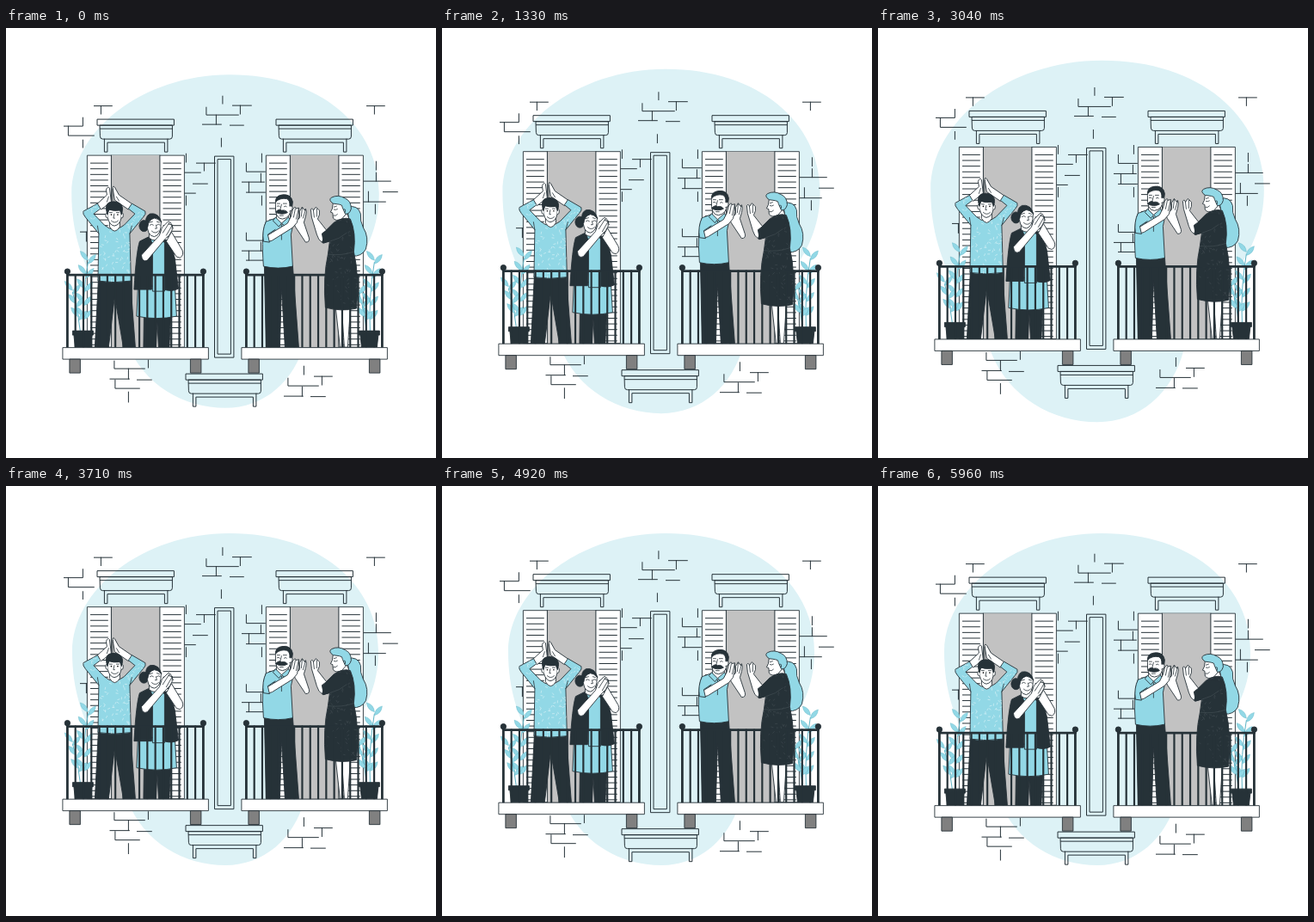
Write an HTML page that moves like this. It is 500 px wide and 500 px high and loops after 6 s.

```html
<!DOCTYPE html>
<html lang="en">
<head>
<meta charset="utf-8">
<title>Applause from the balconies</title>
<style>
html, body { margin: 0; width: 100%; height: 100%; overflow: hidden; background: #fff; }
svg { display: block; width: 100vw; height: 100vh; }
.l { fill: none; stroke: #263238; stroke-width: 1; stroke-linecap: round; stroke-linejoin: round; }
.w, .c, .d { stroke: #263238; stroke-width: .9; stroke-linejoin: round; }
.w { fill: #fff; }
.c { fill: #92d8e6; }
.d { fill: #263238; }
.g { fill: #c2c2c2; }
.t { fill: none; stroke: #263238; stroke-width: .8; stroke-linecap: round; }
</style>
</head>
<body>
<svg viewBox="0 0 500 500">
<defs>
  <g id="lintel">
    <path class="l" d="M106 106H195V113H106ZM109 113H193V126Q193 129 190 129H112Q109 129 109 126ZM109 117H193M114 129V144H117.500V133H184V144H187.500V129"/>
  </g>
  <g id="window">
    <path class="w" d="M94 148H207V371H94Z"/>
    <path class="g" d="M122 148H178.500V371H122Z"/>
    <path class="l" d="M122 148V371M178.500 148V371"/>
    <path class="l" id="slats"/>
  </g>
  <g id="rail">
    <path class="l" id="bars" style="stroke-width:2.200"/>
    <path class="l" d="M71 287H229" style="stroke-width:2.800"/>
    <path class="l" d="M71 284V371M229 284V371" style="stroke-width:2.800"/>
    <circle class="d" cx="71" cy="283" r="3.200"/><circle class="d" cx="229" cy="283" r="3.200"/>
    <path class="w" d="M65.500 371.500H235V385H65.500Z"/>
    <path class="w" style="fill:#808080" d="M73.500 385H86V401H73.500ZM214 385H226.500V401H214Z"/>
  </g>
  <g id="plant">
    <g id="leaves" fill="#92d8e6" stroke="#5fb4c6" stroke-width=".4"></g>
    <path class="d" d="M77 352H101V357H99.500L98 371H80L78.500 357H77Z"/>
  </g>
  <path id="sweater" d="M106 204L89.500 213Q88.500 216 92 220L107.500 239L106.500 294Q125 297 145 294L143.500 239L159 220Q163 216 161.500 213L146 204L142 210L149.500 216L137 229Q125 239 114 229L101.500 216L109.500 210Z"/>
  <path id="dress" d="M381 226Q392 219 400 222Q407 238 404 260Q411 290 407 326Q390 330 371 325Q368 290 374 263L376 248L368 250Q364 246 366 241Z"/>
  <clipPath id="sweaterClip"><use href="#sweater"/></clipPath>
  <clipPath id="dressClip"><use href="#dress"/></clipPath>
</defs>

<path id="blob" fill="#ddf2f6" d="M260 55C365 55 433 115 433 193C433 272 372 305 347 365C335 410 300 441 255 441C208 441 160 415 141 365C127 322 77 283 77 193C77 121 158 55 260 55Z"/>

<g id="scene">
  <path class="l" id="bricks"/>
  <path class="l" d="M242.500 149H264.500V383H242.500ZM246 152.500H261V379H246Z"/>
  <use href="#lintel"/><use href="#lintel" x="208"/><use href="#lintel" x="103" y="296"/>
  <use href="#window"/><use href="#window" x="208"/>
  <use href="#plant"/><use href="#plant" x="333"/>

  <!-- man with raised arms -->
  <path class="d" d="M107 292L103 371H119L126 312L136 371H150L144 292Z"/>
  <path class="w" d="M105 205L117 194L116 188Q118 183 120 186L122 202L110 211ZM147 205L131 194L126 185Q123 182 124 188L126 200L142 211Z"/>
  <path class="t" d="M123.500 187V202M128 196L131 201M119 196L117 202"/>
  <use href="#sweater" class="c"/>
  <path id="knit" stroke="#fff" stroke-width=".6" fill="none" opacity=".7" clip-path="url(#sweaterClip)"/>
  <path class="t" d="M107.500 239L106 230M143.500 239L146 230"/>
  <path class="w" d="M120 225V231Q126 241 132 231V225Z"/>
  <path class="w" d="M117 211L118 221Q120 229 125.500 230Q132 229 133.500 221L134 211Z"/>
  <path class="w" d="M118 215Q114 214 116 220L118 221M133.500 215Q137 214 135.500 220L133.500 221"/>
  <path class="d" d="M117.500 217Q114 206 119 203Q126 200 132 204Q137 207 134 217L132 212Q124 213 119.500 211Z"/>
  <path class="t" d="M120 214.500H123M128 214.500H131M125.500 216L124.500 221H126M122 224Q126 228 130 224"/>
  <circle cx="122" cy="217" r=".8"/><circle cx="129.500" cy="217" r=".8"/>

  <!-- woman with a bun -->
  <path class="d" d="M160 335L159.500 371H174L175.500 342L177 371H189.500L191 335Z"/>
  <path class="c" d="M153 300L151.500 335Q175 340 198 335L196 300Z"/>
  <path class="d" d="M165 243L155 248Q151 260 148.500 304H169L171 246ZM183 246V304Q193 307 200 303L196 268L190 247Z"/>
  <path class="c" d="M167 243L170 252V306H184V250L180 243Z"/>
  <ellipse class="d" cx="160" cy="230" rx="5.500" ry="6.500"/>
  <path class="w" d="M166 237V244Q173 250 179 243V237Z"/>
  <path class="w" d="M163.500 224Q163 242 172 242.500Q180 241 180 225L176 218H167Z"/>
  <path class="d" d="M163 232Q160 219 167 216Q177 214 180.500 226Q176 221 172 221Q165 223 164.500 231Z"/>
  <path class="t" d="M167 229Q169 227 171 229M175 229Q177 227 179 229M174 229L175 233H173M169 236Q173 240 177 236M166.500 226L170 225M175 225L178 226"/>
  <path class="w" d="M192 237L204.500 258Q207 264 202 267L198 266L186 248Z"/>
  <path class="w" d="M157 264L178 241L181 232L188 225Q191 224 189 228L193 229Q194 235 190 240L184 246L164 270Q158 273 157 264Z"/>
  <path class="t" d="M189 227L182 238M193 229L186 241M191 226L194 233"/>

  <!-- man with a moustache -->
  <path class="d" d="M300 276L302 371H318L320 303L324 371H340L333 276Z"/>
  <path class="c" d="M313 221L302 225Q296 238 299 277Q316 281 333 277L331 240L334 226L327 220Z"/>
  <path class="w" d="M314 216V223L320 229L328 222V216Z"/>
  <path class="c" d="M313 220L310 224L317 231L320 227ZM328 220L331 224L325 231L320 227Z"/>
  <path class="t" d="M320 229V246M309 236H315"/>
  <path class="w" d="M313 204Q312 222 321 222Q331 221 332 206Q331 194 322 194Q314 195 313 204Z"/>
  <path class="d" d="M313 202Q313 195 320 194Q331 192 333 202L332 210L329.500 207Q330 200 326 198.500Q319 197 313 202Z"/>
  <path class="w" d="M330 207Q334 206 332 212L329 213"/>
  <path class="d" d="M313 214Q317 209.500 320 212Q325 211 327 214.500Q320 218 313 214Z"/>
  <path class="t" d="M315 204H318M322 204H326M315 207Q317 206 318 207.500M323 207.500Q325 206 326 207.500M320 205L318.500 211M318 218H322"/>
  <path class="w" d="M334 226L341 221L341 213L344 208L347 212L348 210Q350 213 348 219L346 226L352 244Q353 249 348 249L336 231Z"/>
  <path class="w" d="M302 242L327 227L331 219L333 211Q336 206 337 210L340 209Q341 218 338 226L333 232L309 247Q303 250 302 242Z"/>
  <path class="t" d="M336 210L334 220M340 210L337 222M344 209L343 219M348 211L345 221"/>
  <path class="c" d="M302 225Q297 235 299 248L306 249L304 240L313 234"/>

  <!-- woman with a ponytail -->
  <path class="w" d="M383 326L388 371H392L390.500 350L391 326ZM390 326L393 371H397L400 326Z"/>
  <path class="c" d="M396 208Q409 205 412 216Q411 224 415 232Q422 243 418 257Q413 266 402 265Q400 250 400 232Z"/>
  <path class="w" d="M388 219L386 228Q394 231 399 223L396 215Z"/>
  <path class="w" d="M380 203L379 210L377 214L379.500 215L380 221Q383 225 390 222L397 214L395 203Z"/>
  <path class="c" d="M380 204Q374 200 378 197Q386 193 394 198Q401 201 401 210Q399 217 394 216L391 209Q391 205 387 205Z"/>
  <path class="t" d="M381 208L384 207M381 211Q383 212 385 210.500M380.500 218Q383 219 385 216.500M392 211Q395 209 394 214"/>
  <use href="#dress" class="d"/>
  <path id="weave" stroke="#465156" stroke-width=".5" fill="none" clip-path="url(#dressClip)"/>
  <path class="w" d="M355 220L354 211Q356 208 357 212L360 208L364 212Q365 217 362 222L373 236L367 249Q363 247 361 240Z"/>
  <path class="t" d="M357 212L358 220M361 210L361 219"/>
  <path class="d" d="M384 226L367 239L369 250Q380 246 396 240L400 227Z"/>
  <path fill="none" stroke="#465156" stroke-width=".6" d="M376 248Q388 245 396 238M374 263Q390 265 404 260"/>

  <use href="#rail"/><use href="#rail" x="208"/>
</g>
</svg>
<script>
const $ = id => document.getElementById(id);
const draw = (id, d) => $(id).setAttribute('d', d);

let slats = '';
for (let y = 157; y < 370; y += 6.6) slats += `M98 ${y}H118M182.5 ${y}H203`;
draw('slats', slats);

let bars = '';
for (let i = 1; i < 17; i++) bars += `M${71 + i * 158 / 17} 287V371`;
draw('bars', bars);

const sideBricks = 'M279 157V167H301M296 169V179M274 179H300M282 179V191M279 191H301';
draw('bricks', [
  'M251.500 79V88M263 90H285M272 90V100M232.500 92V101H270M244 101V112M228 112H250M260 113H276M250 128V138',
  'M102 90.500H123M110 90.500V100M89 104V114H67M72 114V125H102M89 130V139',
  'M419 90.500H440M428 90.500V100',
  'M209 146V156M221 157H243M230 157V166M207 168H226M217 181H234M207 192H220M209 195V206',
  'M297 146V156M297 195V206', sideBricks,
  'M279 238V247H301M296 249V259M274 259H300M282 259V270M279 270H301',
  'M430 155V165M430 168V178M414 178H447M438 190.500H455M414 202H441M421 190V202M429 205V216',
  'M86 237H94M93 237V248',
  'M125.500 387V396H161M165 386V395M142 396V408M120.500 408H143M152 409H169M126.500 409V419H155M142 423V435',
  'M346 393V403M358 405H379M367 405V415M327.500 407V416H363M344 417V428M323 428H345M354 428.500H371'
].join(''));

// Leaves grow in pairs along two bending stems.
function stem(x0, x1, top, pairs) {
  let s = `<path d="M${x0} 353Q${x0 - 2} ${(353 + top) / 2} ${x1} ${top}" fill="none" stroke="#5fb4c6" stroke-width="1"/>`;
  for (let i = 1; i <= pairs; i++) {
    const k = i / pairs, x = x0 + (x1 - x0) * k * k - 3 * k * (1 - k), y = 353 + (top - 353) * k;
    for (const side of [-1, 1])
      s += `<path d="M0 0Q-5 -7 0 -14Q5 -7 0 0Z" transform="translate(${x} ${y + side * 2}) rotate(${side * 40})"/>`;
  }
  return s;
}
$('leaves').innerHTML = stem(90, 95, 272, 5) + stem(86, 77, 307, 3);

let seed = 7;
const rnd = () => (seed = seed * 16807 % 2147483647) / 2147483647;
function flecks(id, x, y, w, h, n) {
  let d = '';
  while (n--) {
    const a = rnd() * 6.28;
    d += `M${x + rnd() * w} ${y + rnd() * h}l${3 * Math.cos(a)} ${3 * Math.sin(a)}`;
  }
  draw(id, d);
}
flecks('knit', 88, 203, 75, 90, 170);
flecks('weave', 368, 222, 42, 105, 110);

// Piecewise linear: stops are [time, value] pairs.
function lerp(stops, t) {
  const i = stops.findIndex(s => s[0] > t), [a, u] = stops[i - 1], [b, v] = stops[i];
  return u + (v - u) * (t - a) / (b - a);
}
const beat = [[0, 1], [600, 1.1], [1800, 1], [2400, 1], [3000, 1.1], [3600, 1], [6000, 1]];
const lift = [[0, 0], [3000, -10], [6000, 0]];

const start = performance.now();
function frame() {
  const t = (performance.now() - start + 25) % 6000;
  $('blob').setAttribute('transform', `translate(255 248) scale(${lerp(beat, t)}) translate(-255 -248)`);
  $('scene').setAttribute('transform', `translate(.4 ${lerp(lift, t) + .2})`);
  requestAnimationFrame(frame);
}
frame();
</script>
</body>
</html>
```
